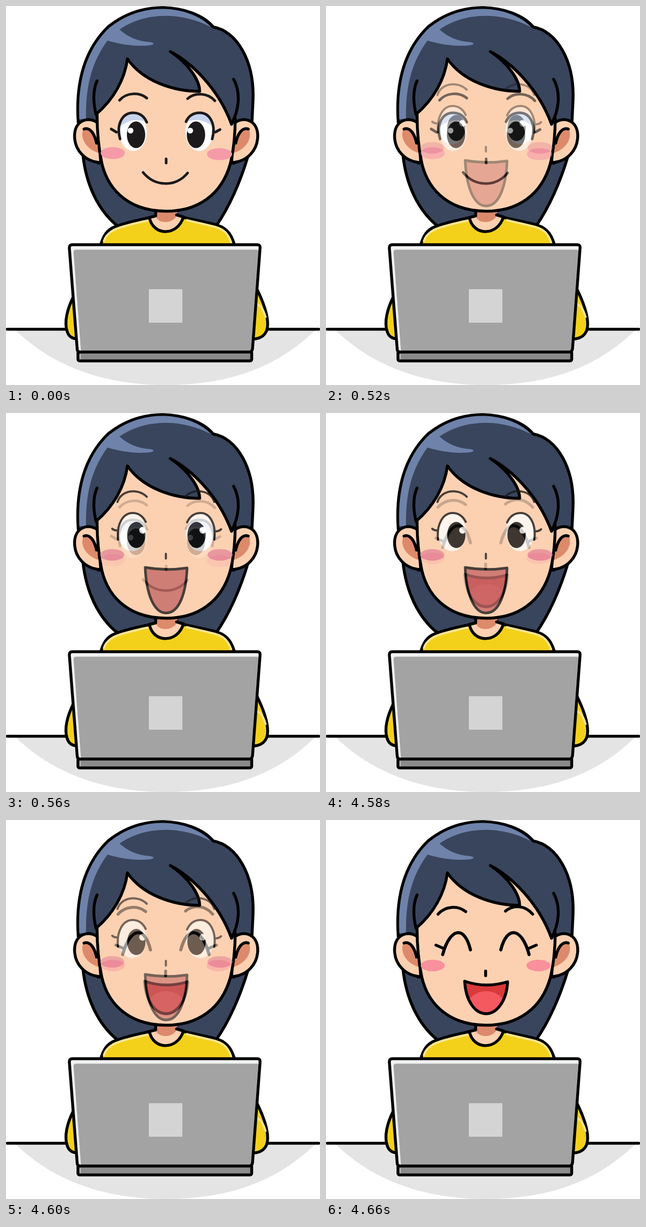
These frames come from a looping animation (600x724 px, 8000 ms). An HTML page:

```html
<!DOCTYPE html>
<html lang="en">
<head>
<meta charset="utf-8">
<title>Girl at a laptop</title>
<style>
  html, body { margin: 0; width: 100%; height: 100%; overflow: hidden; background: #fff; }
  svg { display: block; width: 100%; height: 100%; }
  .line { fill: none; stroke: #000; stroke-width: 5.5; stroke-linecap: round; stroke-linejoin: round; }
  .ink { stroke: #1c1a1b; stroke-width: 5; }
  .thin { stroke-width: 4; }
  .bold { stroke-width: 6; }
  .hair { fill: #39455c; }
  .shine { fill: #6e82aa; }
  .skin { fill: #fcd1b2; }
  .shade { fill: #dd8a6c; }
  .shirt { fill: #f3d11b; }
  .glow { fill: none; stroke: #f9e591; stroke-width: 4; stroke-linecap: round; }
  .pupil { fill: #1c1a1b; }
  .white { fill: #fff; }
</style>
</head>
<body>
<svg viewBox="0 0 600 724">
  <defs>
    <g id="ear">
      <path class="line skin" d="M176 224C157 209 131 219 131 248C131 276 152 298 181 299Z"/>
      <path class="shade" d="M147 237C157 231 169 242 173 262L178 281C158 276 141 257 147 237Z"/>
      <path class="line" d="M149 235C160 231 169 243 173 262"/>
    </g>

    <g id="scene">
      <rect class="white" width="600" height="724"/>
      <path fill="#e4e4e4" d="M17 618C90 690 190 724 305 724C425 724 520 690 592 618Z"/>
      <path class="line" d="M2.500 617.500H597.500"/>

      <!-- hair behind the head -->
      <path class="line hair" d="M147 285C153 340 175 390 214 421H401C428 382 448 335 463 285Z"/>
      <path class="line hair" d="M138 222C133 150 148 86 195 40C230 12 265 3 300 3C340 4 377 17 396 40C441 48 475 105 472 180L470 222L436 300H176Z"/>
      <path class="shine" d="M140 216C137 150 151 86 197 42C231 15 266 5.500 300 5.500C338 6 372 20 391 40C330 8 260 14 217 45C232 58 248 67 276 69C285 71 283 74 275 75C250 78 220 74 194 66C163 108 152 155 153 216Z"/>

      <!-- body -->
      <path class="line shirt" d="M180 460C184 445 189 432 203 424C225 414 250 410 275 404H339C370 411 398 415 414 423C429 432 433 445 438 460Z"/>
      <path class="glow" d="M187 449C192 433 207 426 225 421S255 413 271 410"/>
      <path class="glow" d="M345 409L392 420C416 425 424 434 430 451"/>
      <path class="skin" d="M286 385V400L274 404C280 440 327 440 339 403L326 399V385Z"/>
      <path class="shade" d="M286 385V401C291 418 321 416 327 399V385Z"/>
      <path class="line" d="M286 392V401L274 404C281 440 328 440 339 403L326 399"/>
      <path class="line shirt" d="M130 553C116 580 111 605 117 622C120 632 128 636 138 636Z"/>
      <path class="line shirt" d="M479 540C490 562 500 588 500 608C500 628 487 637 468 636Z"/>
      <path class="glow" d="M479 569C488 573 492 581 496 594"/>

      <!-- head -->
      <use href="#ear"/>
      <use href="#ear" transform="translate(612 0) scale(-1 1)"/>
      <path class="hair" d="M176 170V224L200 190ZM420 170L431 226L440 215L446 170Z"/>
      <path class="skin" d="M173 207C206 178 227 140 232 101C262 144 320 163 370 163C370 140 346 108 314 87C352 107 405 155 431 226L438 218C438 245 436 270 429 300C412 362 365 392 306 392C244 392 197 360 183 300C177 272 174 240 173 207Z"/>
      <path class="line" d="M174 207C174 240 177 272 183 300C197 360 244 392 306 392C365 392 412 362 429 300C436 270 438 245 438 214"/>
      <path class="line" d="M174 143C164 165 168 190 172 207C206 178 227 140 232 101C262 144 320 163 370 163C370 140 346 108 314 87C352 107 405 155 431 226C444 200 450 168 435 140"/>

      <!-- laptop -->
      <rect x="137.500" y="659" width="332" height="19" rx="3" fill="#8a8a8a"/>
      <path stroke="#b5b5b5" stroke-width="3" d="M141.500 665V675"/>
      <rect class="line" x="137.500" y="659" width="332" height="19" rx="3"/>
      <path fill="#eff2f1" d="M127 456H480Q486 456 485.500 462L471 655Q470 661 465 661H142Q136 661 136 655L121 462Q121 456 127 456Z"/>
      <path fill="#a3a3a3" d="M129 470Q129 465.500 134 465.500H479Q483 465.500 482 470L468 659H145Q143 659 143 656Z"/>
      <path class="line" d="M127 456H480Q486 456 485.500 462L471 655Q470 661 465 661H142Q136 661 136 655L121 462Q121 456 127 456Z"/>
      <rect x="273" y="541" width="64" height="64" fill="#d4d4d4"/>
    </g>

    <clipPath id="leftEye"><ellipse cx="243" cy="241" rx="26" ry="36"/></clipPath>
    <clipPath id="rightEye"><ellipse cx="369" cy="241" rx="26" ry="36"/></clipPath>
    <clipPath id="laughShape"><path d="M265 308Q306 322 347 309C345 348 325 370 306 370C285 370 267 346 265 308Z"/></clipPath>
  </defs>

  <g id="smile">
    <use href="#scene"/>
    <g fill="#f59ba8">
      <ellipse cx="204" cy="281" rx="23" ry="11.500"/>
      <ellipse cx="408" cy="283" rx="24" ry="11.500"/>
    </g>
    <g class="white">
      <ellipse cx="243" cy="241" rx="26" ry="36"/>
      <ellipse cx="369" cy="241" rx="26" ry="36"/>
    </g>
    <path fill="#c8d3ee" clip-path="url(#leftEye)" d="M212 200H275V226Q243 206 214 234Z"/>
    <path fill="#c8d3ee" clip-path="url(#rightEye)" d="M338 200H400V234Q369 206 338 226Z"/>
    <g class="pupil">
      <ellipse cx="248.500" cy="246" rx="17.500" ry="25.500"/>
      <ellipse cx="363" cy="246" rx="17.500" ry="25.500"/>
    </g>
    <g class="white">
      <circle cx="238" cy="238" r="5.500"/>
      <circle cx="352" cy="238" r="5.500"/>
    </g>
    <path class="line ink" d="M217 180C230 165 255 164 269 176M347 177C360 165 385 165 399 181
      M218 254C210 225 223 204 243 204C256 204 264 211 269 222M344 221C349 210 357 204 370 204C389 204 402 225 394 254
      M201 235L211 241M409 236L400 241M306 292V300M262 318C285 346 325 346 347 319"/>
  </g>

  <g id="gasp">
    <use href="#scene"/>
    <g fill="#e58a98">
      <ellipse cx="203" cy="271" rx="23" ry="11"/>
      <ellipse cx="409" cy="271" rx="24" ry="11"/>
    </g>
    <g class="white">
      <ellipse cx="241" cy="228" rx="27" ry="36"/>
      <ellipse cx="371" cy="228" rx="27" ry="36"/>
    </g>
    <g fill="#0e0f10">
      <ellipse cx="249" cy="233" rx="17.500" ry="25"/>
      <ellipse cx="364" cy="233" rx="17.500" ry="25"/>
    </g>
    <g class="white">
      <circle cx="261" cy="224" r="6.500"/>
      <circle cx="376" cy="224" r="6.500"/>
    </g>
    <path class="line ink thin" d="M213 170C220 147 252 143 269 160M343 159C360 143 390 147 398 170M305.500 269V278
      M214 242C211 213 223 191 242 191C254 191 262 198 267 208M346 209C351 198 359 191 372 191C390 191 402 213 398 242
      M203 221Q207 225 213 224M411 222Q407 226 401 226"/>
    <path class="line ink" style="fill:#c56a67" d="M266 295Q306 302 346 296C344 344 331 382 306 382C282 382 268 344 266 295Z"/>
  </g>

  <g id="laugh">
    <use href="#scene"/>
    <g fill="#f9909b">
      <ellipse cx="204" cy="278" rx="23" ry="11"/>
      <ellipse cx="406" cy="278" rx="23" ry="11"/>
    </g>
    <path class="line" d="M214 180C228 164 252 163 267 175M343 174C358 162 380 162 395 180
      M210 239L224 245M402 239L388 245M305 288.500V297.500"/>
    <path class="line bold" d="M223 257C237 205 265 201 276 248M334 248C346 201 374 205 388 257"/>
    <g clip-path="url(#laughShape)">
      <rect x="260" y="300" width="92" height="75" fill="#d9393b"/>
      <ellipse cx="306" cy="354" rx="35" ry="27" fill="#f4595f"/>
    </g>
    <path class="line" d="M265 308Q306 322 347 309C345 348 325 370 306 370C285 370 267 346 265 308Z"/>
  </g>
</svg>
<script>
  const LOOP = 8000, STEP = 20, STEPS = 5;

  // Each pose fades in over the one below it, in hard steps.
  const poses = [["gasp", 500], ["laugh", 4580]];
  const layers = poses.map(([id, start]) => ({ el: document.getElementById(id), start }));

  function opacityAt(time, start) {
    const step = Math.floor((time - start) / STEP) + 1;
    return Math.min(Math.max(step / STEPS, 0), 1);
  }

  function draw() {
    const time = performance.now() % LOOP;
    for (const { el, start } of layers) el.style.opacity = opacityAt(time, start);
    requestAnimationFrame(draw);
  }
  draw();
</script>
</body>
</html>
```
